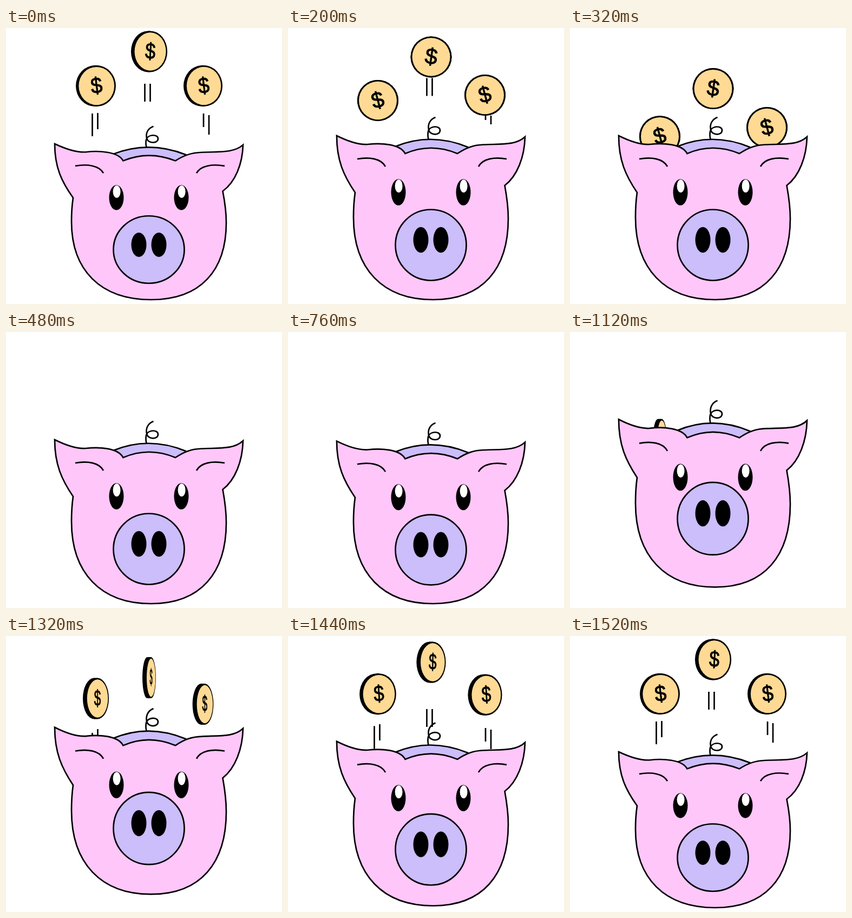
Recreate the animation shown at these times as an HTML page with a canvas. Size 510 px wide and 510 px high, loop 1560 ms.

```html
<!DOCTYPE html>
<html lang="en">
<head>
<meta charset="utf-8">
<title>Piggy bank</title>
<style>
  html, body { margin: 0; width: 100%; height: 100%; overflow: hidden; background: #fff; }
  canvas { display: block; }
</style>
</head>
<body>
<canvas id="stage" width="510" height="510"></canvas>
<script>
const ctx = document.getElementById('stage').getContext('2d');
const LOOP = 1560, STEP = 40, TOP = 1520, GROUND = 502;
const PINK = '#ffc6fa', LILAC = '#ccbdfb', GOLD = '#ffda94';

const shapes = {
  tail: new Path2D('M272.5 165C262 169 258 178 260 188C262 199 281 199 281 189C281 180 262 180 259 191C258 197 258 201 260 207'),
  slot: new Path2D('M198 219Q264 192 332 220V250H198Z'),
  head: new Path2D(`M90 199C108 208 128 216 147 215C172 212 207 214 216.500 232Q264 211.500 313 232
    C328 222 342 216 362 215.500C395 214 421 217 438 201C437 238 424 273 400.500 291
    C404 310 407 330 407 352C407 445 360 502 268 502C175 502 121 445 121 350C121 334 122 318 124 304
    C103 273 90 245 90 199Z`),
  folds: new Path2D('M128 242C150 238 172 241 180 256M404 242C382 238 360 241 352 256')
};

// peak: step at which the coin turns; spin: angle at the hold and its easing power
// lines: x, top, bottom, speed while rising, speed while falling
const coins = [
  { x: 166, y: 107, peak: -0.86, fall: 0.134, spin: 20, power: 1.5, tilt: -15,
    lines: [[159.5, 158, 200, 4.2, 6], [169.5, 157, 187, 3, 4]] },
  { x: 264.5, y: 43, peak: 1.57, fall: 0.26, spin: 34, power: 1.17, tilt: 8,
    lines: [[256.5, 103, 136, 16, 2.1], [266.5, 103, 136, 16, 2.1]] },
  { x: 364, y: 107, peak: 0.41, fall: 0.176, spin: 25, power: 1.38, tilt: -15,
    lines: [[365, 158, 183, 6, 2.6], [375, 161, 197, 6, 3.8]] }
];

const clamp = v => Math.min(1, Math.max(0, v));
const part = (t, from, to) => clamp((t - from) / (to - from));
const smooth = x => x * x * (3 - 2 * x);

// -1 is the crouch, 0 standing, 1 well up in the jump
function pigPose(t) {
  if (t < 720) return smooth(part(t, 0, 160)) - 1;
  if (t < 870) return -smooth(part(t, 720, 870));
  if (t < 1140) return 1.25 - 2.25 * (1 - part(t, 870, 1140)) ** 3;
  return 1.25 - 2.25 * part(t, 1140, TOP) ** 3;
}

function paint(path, fill) {
  if (fill) {
    ctx.fillStyle = fill;
    ctx.fill(path);
  }
  ctx.stroke(path);
}

function oval(x, y, rx, ry, fill) {
  ctx.beginPath();
  ctx.ellipse(x, y, rx, ry, 0, 0, 2 * Math.PI);
  ctx.fillStyle = fill;
  ctx.fill();
}

function drawCoin(coin, s) {
  const d = s - coin.peak;
  const y = coin.y + (d < 0 ? 0.12 * -(d ** 3) : coin.fall * d ** 3);

  ctx.lineWidth = 2.7;
  for (const [x, top, bottom, rise, drop] of coin.lines) {
    const shift = -s * (s < 0 ? rise : drop);
    const from = Math.max(top + shift, y + 38), to = bottom + shift;
    if (from < to && from < 300) {
      ctx.beginPath();
      ctx.moveTo(x, from);
      ctx.lineTo(x, to);
      ctx.stroke();
    }
  }
  if (y > 290) return;

  const angle = coin.spin * Math.max(0, 1 - s / 5) ** coin.power * Math.PI / 180;
  const width = Math.max(0.02, Math.abs(Math.cos(angle)));
  const edge = 3.7 * Math.abs(Math.sin(angle));
  ctx.save();
  ctx.translate(coin.x, y);
  oval(-edge, 0, 38 * width, 38, '#000');
  ctx.fillRect(-edge, -38, 2 * edge, 76);
  oval(edge, 0, 38 * width, 38, '#000');
  ctx.translate(edge, 0);
  ctx.scale(width, 1);
  oval(0, 0, 35, 35.2, GOLD);
  ctx.rotate(coin.tilt * clamp((s + 5) / 10) * Math.PI / 180);
  ctx.fillStyle = '#000';
  ctx.lineWidth = 1;
  ctx.fillText('$', 0, 13);
  ctx.strokeText('$', 0, 13);
  ctx.restore();
}

function drawPig(pose) {
  const up = Math.max(0, pose), down = Math.min(0, pose);
  const stretch = 1 + 0.018 * up + 0.0495 * down;
  ctx.save();
  ctx.translate(0, GROUND - 24.5 * up);
  ctx.scale(1, stretch);
  ctx.translate(0, -GROUND);
  ctx.lineWidth = 2.7;
  paint(shapes.tail);
  paint(shapes.slot, LILAC);
  paint(shapes.head, PINK);
  paint(shapes.folds);
  for (const x of [204, 324]) {
    oval(x, 303.5, 13.5, 24.3, '#000');
    oval(x + 0.6, 292, 7, 12, '#fff');
  }
  ctx.translate(0, (-18.7 * up - 3.5 * down) / stretch);
  oval(264, 401, 65.5, 65.5, LILAC);
  ctx.stroke();
  for (const x of [245.5, 282.5]) oval(x, 391.5, 14, 23.7, '#000');
  ctx.restore();
}

function draw(now) {
  const t = Math.floor(now % LOOP / STEP) * STEP;
  const s = t < 720 ? t / STEP : Math.min(0, (t - TOP) / STEP);
  ctx.fillStyle = '#fff';
  ctx.fillRect(0, 0, 510, 510);
  ctx.strokeStyle = '#000';
  ctx.font = '41px "Liberation Sans", Arial, sans-serif';
  ctx.textAlign = 'center';
  for (const coin of coins) drawCoin(coin, s);
  drawPig(pigPose(t));
}

const start = performance.now();
function tick() {
  draw(performance.now() - start);
  requestAnimationFrame(tick);
}
tick();
</script>
</body>
</html>
```
